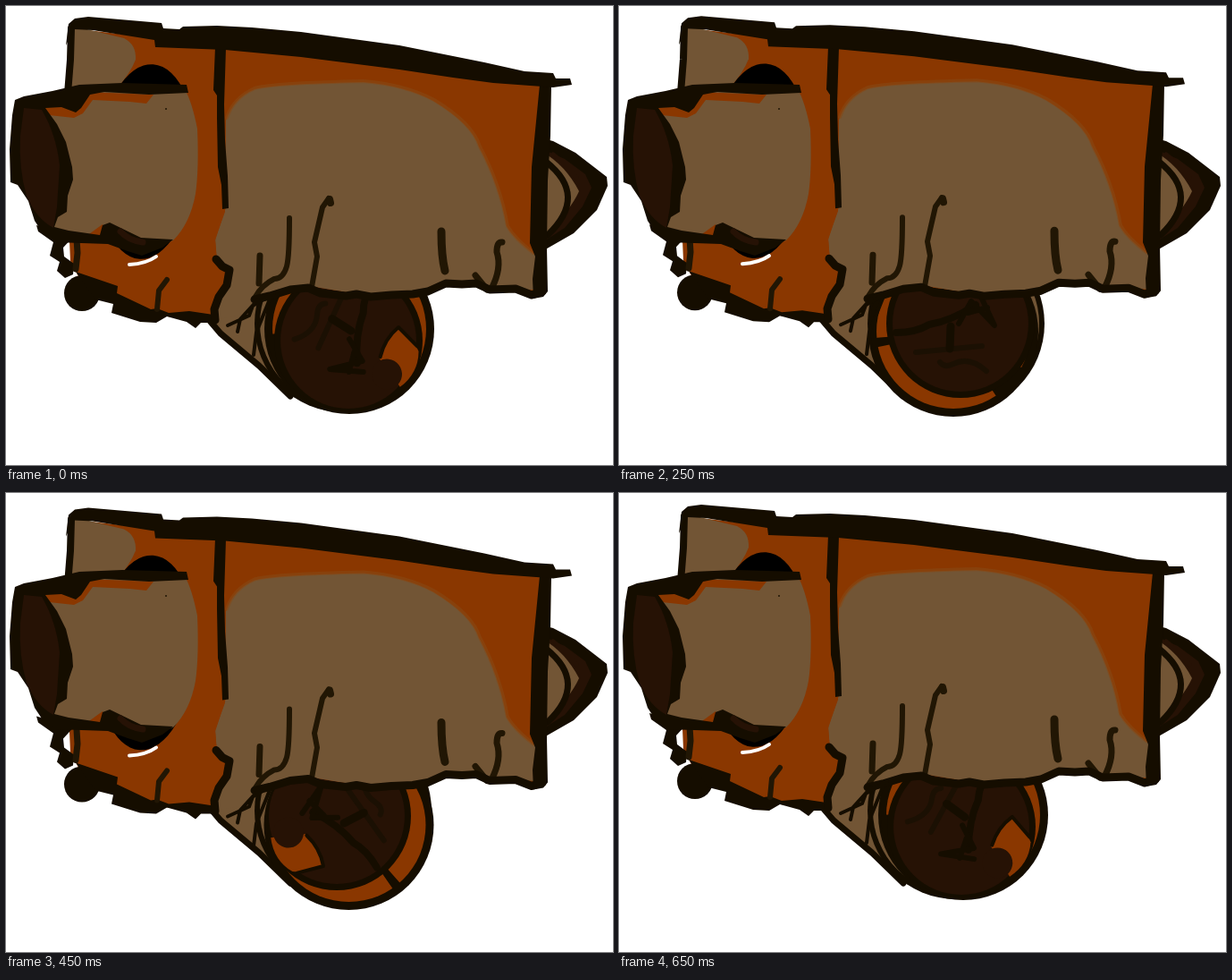
An HTML page with a canvas for the animation above (700 ms loop, 679 px wide and 513 px high).

```html
<!DOCTYPE html>
<html lang="en">
<head>
<meta charset="utf-8">
<title>Rolling machine</title>
<style>
html, body { margin: 0; width: 100%; height: 100%; overflow: hidden; background: #fff; }
canvas { display: block; width: 100vw; height: 100vh; }
</style>
</head>
<body>
<canvas id="stage" width="679" height="513"></canvas>
<script>
const ctx = document.getElementById('stage').getContext('2d');
const LOOP = 700, STEP = 50;
const RUST = '#8a3700', TAN = '#725535', INK = '#150d00', DARK = '#261205', FOLD = '#211604';

// Keys are [time, value, ...values], blended linearly.
const BOUNCE = [[0, 0], [150, 12], [250, -0.8], [350, -12], [400, -3], [500, 12], [650, 1], [700, 0]];
const SPIN = [[0, 120], [100, 62], [250, 0], [350, -60], [400, -90], [500, -150], [650, -236], [700, -240]];
const RIM = [[0, 384, 361], [100, 380, 367], [250, 374, 364], [350, 375, 375],
  [400, 379, 373], [500, 388, 369], [650, 385, 360], [700, 384, 361]];
const CORE = [[0, 383, 374], [100, 388, 365], [250, 382, 355], [350, 372, 354],
  [400, 373, 355], [500, 367, 367], [650, 383, 373], [700, 383, 374]];

function at(keys, time) {
  const i = keys.findIndex(k => k[0] > time);
  const a = keys[i - 1], b = keys[i];
  const u = (time - a[0]) / (b[0] - a[0]);
  return a.slice(1).map((v, n) => v + (b[n + 1] - v) * u);
}

function fill(d, color) {
  ctx.fillStyle = color;
  ctx.fill(new Path2D(d));
}

function line(d, width, color = INK) {
  ctx.strokeStyle = color;
  ctx.lineWidth = width;
  ctx.stroke(new Path2D(d));
}

function disc(x, y, r, color) {
  ctx.fillStyle = color;
  ctx.beginPath();
  ctx.arc(x, y, r, 0, Math.PI * 2);
  ctx.fill();
}

function drawTail() {
  fill('M600 148L612 151L637 164L672 191L673 201L661 228L635 254L600 274Z', INK);
  fill('M600 160L625 171L648 188L655 203L645 224L625 248L600 264Z', DARK);
  fill('M600 163Q626 178 641 207Q632 228 600 259Z', TAN);
  line('M604 174Q652 212 606 256', 7);
  line('M612 166Q630 180 638 192', 5, DARK);
}

function drawHousing() {
  fill('M223 346L240 366L283 402L318 436L345 420L300 300Z', TAN);
  line('M223 346L240 366L283 402L318 436', 7);
  disc(377, 355, 99, INK);
  disc(377, 355, 93, TAN);
}

function drawWheel(time) {
  const [rx, ry] = at(RIM, time), [cx, cy] = at(CORE, time), [deg] = at(SPIN, time);
  const turn = deg * Math.PI / 180;

  disc(rx, ry, 95, INK);
  disc(rx, ry, 86, RUST);
  ctx.save();
  ctx.beginPath();
  ctx.arc(rx, ry, 92, 0, Math.PI * 2);
  ctx.clip();

  // Dark bars that split the crescent between rim and core.
  ctx.lineCap = 'butt';
  for (const [angle, spread] of [[42, 0.25], [172, 0.06]]) {
    const a = turn + angle * Math.PI / 180;
    ctx.strokeStyle = INK;
    ctx.lineWidth = 30;
    ctx.beginPath();
    ctx.arc(rx, ry, 78, a - spread, a + spread);
    ctx.stroke();
  }
  ctx.lineCap = 'round';

  disc(cx, cy, 83, INK);
  disc(cx, cy, 76, DARK);
  ctx.translate(cx, cy);
  ctx.rotate(turn);
  fill('M0 -40Q-20 -34 -41 -42Q-37 -64 -29 -74Q-8 -86 16 -76Z', RUST);
  line('M-2 -40Q-22 -34 -41 -41L-33 -70', 4);
  disc(11, -56, 17, DARK);
  line('M-72 10Q-50 10 -35 1Q-10 -3 17 -21', 8);
  line('M-50 32L24 25M-23 43Q-18 50 -8 45Q10 36 29 53', 6, '#1b1003');
  line('M-11 3L-12 28', 9);
  line('M-2 0L12 -25L38 2L22 -32M8 -12L30 -18', 6);
  ctx.restore();
}

function drawSide() {
  fill('M236 40L330 47L470 66L604 88L604 322L570 316L540 316L490 309L460 320L400 323L340 313L290 322L246 335L232 280Z', RUST);
  const tan = 'M246 128Q254 103 278 93Q300 87 400 85Q447 89 478 106Q521 132 529 157Q552 200 560 246Q568 260 592 278'
    + 'L600 318L570 316L540 316L525 308L490 309L460 320L400 323L340 313L318 314L292 323L265 345L238 350L236 285L234 260L245 230Z';
  fill(tan, TAN);
  line('M247 125Q254 103 278 92Q300 86 400 84Q447 88 479 105Q522 131 530 157Q553 200 561 246Q569 260 590 276', 4, 'rgba(135,72,20,.6)');

  line('M317 237Q317 280 314 291Q310 305 300 305Q286 312 279 325', 6, FOLD);
  line('M361 215L354 225L345 264L348 280L342 314', 6, FOLD);
  line('M362 216L363 220', 8, FOLD);
  line('M284 279L283 310', 7, FOLD);
  line('M487 252Q487 280 491 296', 9, FOLD);
  line('M555 264Q549 263 549 275Q555 293 543 316M525 301L538 317', 7, FOLD);

  line('M600 319L588 323L570 316L541 317L526 310L510 311L492 310L472 319L455 322L431 323L408 325L392 322L380 324L352 321L338 315L318 317L295 324L278 328', 9);
  line('M300 321L276 335L272 346L248 357M282 328L262 350L259 364M296 325L280 365L277 390', 4);
  fill('M597 88L610 88L609 145L606 195L605 270L606 319L601 325L590 327L589 305L592 280L586 265L588 180Z', INK);
}

function drawFront() {
  fill('M74 25L168 36L240 46L246 225L234 262L236 287L248 300L234 350L205 350L165 345L85 310L72 285L70 240Z', RUST);
  fill('M74 22L132 36Q146 43 145 60Q139 75 125 91L72 98Z', TAN);
  line('M73 25L72 60L69 98', 8);

  ctx.fillStyle = '#000';
  ctx.beginPath();
  ctx.ellipse(157, 174, 55, 109, 0.07, 0, Math.PI * 2);
  ctx.fill();
  line('M138 289Q157 288 168 280', 4, '#fff');

  fill('M34 245L76 257L64 270L65 280L76 288L75 300L66 304L57 296L60 286L49 279L53 264L36 252Z', INK);
  line('M79 260L80 276L78 294', 7, FOLD);
  disc(85, 321, 20, INK);
  fill('M78 297L125 313L124 321L162 339L169 338L182 343L205 341L232 345L232 354L218 354L212 360L202 353L180 347L168 354L150 353L118 343L120 333L100 328Z', INK);
  line('M180 306L171 318L169 339', 6, FOLD);
  line('M235 283L242 291L250 295L247 312L238 325L233 339L234 351', 9);
  fill('M234 46L246 47L244 110L245 150L248 190L249 226L242 227L241 200L237 180L236 125L236 100L232 94Z', INK);
}

function drawRoof() {
  fill('M67 44L70 20L77 14L92 12L174 19L176 25L194 26L198 23L236 22L275 24L330 29L440 44L535 63L580 73'
    + 'L612 75L615 81L631 81L633 88L612 91L600 90L545 86L500 80L440 71L330 57L245 49L167 46L166 38L97 27L76 26Z', INK);
}

function drawBarrel() {
  fill('M36 108L70 112L90 96L200 93Q208 107 214 137Q216 182 212 210Q206 243 187 262L150 274L110 258L48 255Z', TAN);
  fill('M38 112L77 111L88 96L165 99L157 109L138 107L97 105L86 120L76 125L48 122Z', RUST);
  fill('M90 257L108 244L114 260Z', RUST);
  fill('M10 105L20 101L52 95L82 88L130 86L202 88L204 97L160 99L110 96L94 99L84 114L78 119L62 113L44 114'
    + 'L57 132L67 152L74 180L75 194L69 212L68 230L58 236L54 247L70 251L105 256L108 245L116 242L151 259L187 261'
    + 'L175 270L152 279L136 274L114 266L55 264L40 252L32 240L25 218L13 200L5 197L4 160L7 122Z', INK);
  fill('M20 114L40 116Q56 143 60 178L57 225L53 248Q33 237 23 212Q14 182 16 145Z', DARK);
  line('M128 252Q137 262 153 264', 7, DARK);
  disc(179, 115, 1, FOLD);
}

function draw(time) {
  const [lift] = at(BOUNCE, time);
  ctx.fillStyle = '#fff';
  ctx.fillRect(0, 0, 679, 513);
  drawTail();
  drawHousing();
  drawWheel(time);
  ctx.save();
  ctx.translate(0, lift);
  drawSide();
  drawFront();
  drawRoof();
  ctx.restore();
  drawBarrel();
}

ctx.lineCap = ctx.lineJoin = 'round';
const start = performance.now();

function tick() {
  const elapsed = (performance.now() - start) % LOOP;
  draw(Math.floor(elapsed / STEP) * STEP);
  requestAnimationFrame(tick);
}
tick();
</script>
</body>
</html>
```
